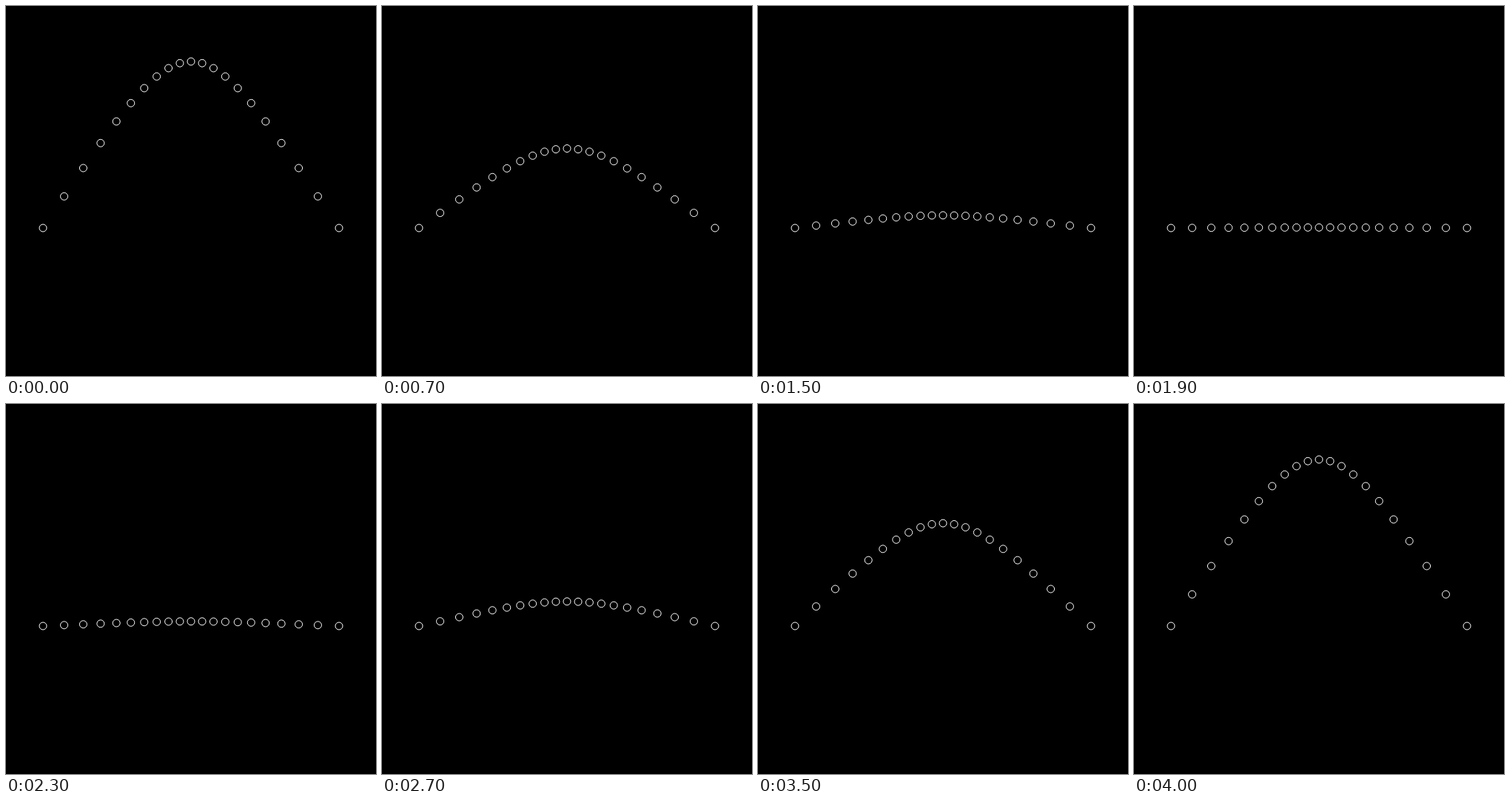
Write an HTML page that moves like this. It is 500 by 500 pixels and loops after 4100 ms.

```html
<!DOCTYPE html>
<html lang="en">
<head>
<meta charset="utf-8">
<title>Points on a curve</title>
<style>
  html, body { margin: 0; width: 100%; height: 100%; overflow: hidden; background: #000; }
  svg { display: block; width: 500px; height: 500px; }
  circle { fill: none; stroke: #fff; stroke-width: 1; }
</style>
</head>
<body>
<svg id="stage" viewBox="0 0 500 500"></svg>
<script>
const SVG_NS = "http://www.w3.org/2000/svg";
const STEP = 100, STEPS = 41, COUNT = 20;
const stage = document.getElementById("stage");

const cubic = (a, b, c, d, t) => {
  const s = 1 - t;
  return a * s * s * s + 3 * b * s * s * t + 3 * c * s * t * t + d * t * t * t;
};

const dots = Array.from({ length: COUNT + 1 }, (_, i) => {
  const t = i / COUNT;
  const el = document.createElementNS(SVG_NS, "circle");
  el.setAttribute("r", 5);
  el.setAttribute("cx", cubic(50, 250, 250, 450, t));
  stage.appendChild(el);
  return { el, t };
});

// Both control points share one height, which follows half a sine wave.
function draw(ms) {
  const step = Math.floor(ms / STEP) % STEPS;
  const y = 300 * Math.sin(Math.PI * step / (STEPS - 1));
  for (const { el, t } of dots) el.setAttribute("cy", cubic(300, y, y, 300, t));
}

const start = performance.now();
function tick() {
  draw(performance.now() - start);
  requestAnimationFrame(tick);
}
tick();
</script>
</body>
</html>
```
